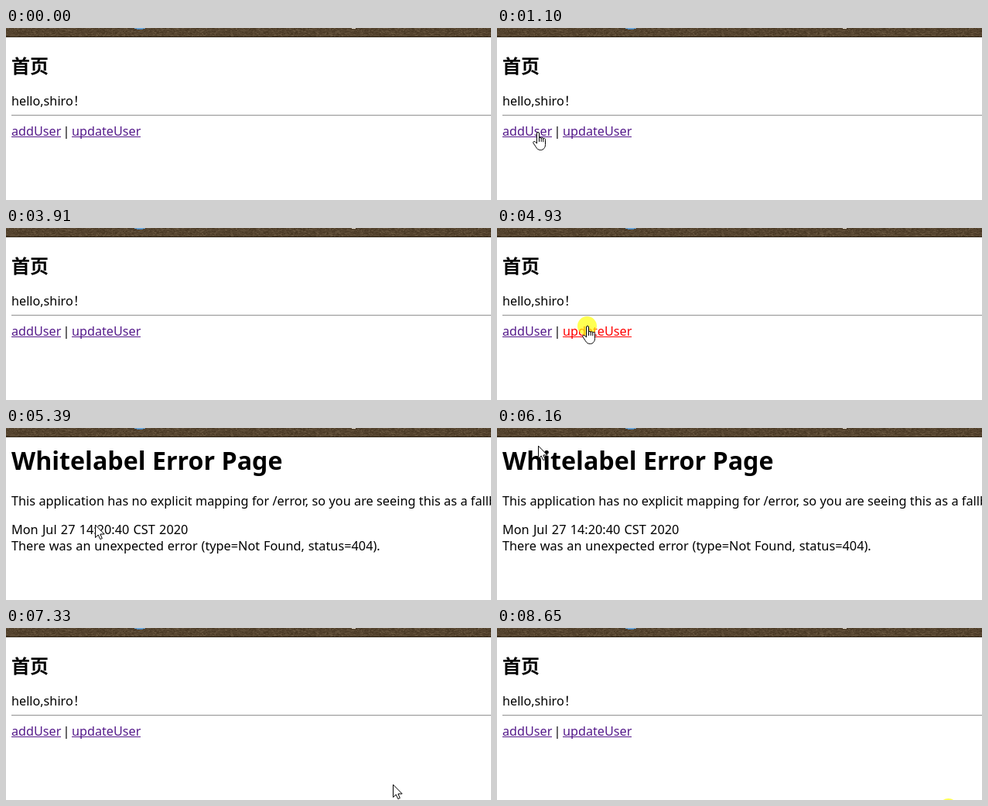
An HTML page with a canvas for the animation above (8.81 s loop, 627 by 222 pixels).

```html
<!DOCTYPE html>
<html lang="zh-CN">
<head>
<meta charset="utf-8">
<title>首页</title>
<style>
  html, body { margin: 0; width: 100%; height: 100%; overflow: hidden; background: #fff; }
  canvas, svg { position: absolute; left: 0; top: 0; display: block; }
  text { font: 16.2px "Noto Sans", "Noto Sans CJK SC", "Noto Sans CJK", sans-serif; fill: #000; white-space: pre; }
  .h1 { font-size: 32.2px; font-weight: 700; }
  .zh { font-size: 32px; font-weight: 700; font-family: "Noto Sans CJK SC", "Noto Sans CJK", sans-serif; }
  .h2 { font-size: 24px; }
  .link { color: #551a8b; }
  .link text { fill: currentColor; }
  .link path { stroke: currentColor; }
  .link.active { color: #f00; }
  .cursor { fill: #fff; stroke: #000; stroke-linejoin: round; stroke-linecap: round; }
</style>
</head>
<body>
<canvas id="strip" width="627" height="12"></canvas>
<svg width="627" height="222" viewBox="0 0 627 222">
  <g id="home">
    <text class="zh h2" x="7" y="58">首页</text>
    <text x="7" y="100">hello,shiro！</text>
    <path d="M7 112.5H627" stroke="#9a9a9a"/>
    <path d="M7 113.5H627" stroke="#eee"/>
    <g class="link" id="addLink">
      <text x="7" y="139">addUser</text>
      <path d="M7 140.5H71"/>
    </g>
    <text x="78" y="139" text-anchor="middle">|</text>
    <g class="link" id="updateLink">
      <text x="85" y="139">updateUser</text>
      <path d="M85 140.5H174"/>
    </g>
  </g>
  <g id="add">
    <text class="zh" x="7" y="69">增加用户</text>
  </g>
  <g id="error">
    <text class="h1" x="7" y="54">Whitelabel Error Page</text>
    <g style="font-size:16.3px">
      <text x="7" y="100" style="font-size:inherit;word-spacing:.1px">This application has no explicit mapping for /error, so you are seeing this as a fallback.</text>
      <text x="7" y="137" style="font-size:inherit;word-spacing:1px">Mon Jul 27 14:20:40 CST 2020</text>
      <text x="7" y="158" style="font-size:inherit;word-spacing:.6px">There was an unexpected error (type=Not Found, status=404).</text>
    </g>
  </g>
  <g id="pointer">
    <circle id="flash" cx=".5" cy=".5" r="12.5" fill="#ff0" fill-opacity=".68"/>
    <path id="arrow" class="cursor" d="M.5 .5V16.5L4.2 13 6.8 18.6 9.3 17.5 6.9 12H11.8Z"/>
    <g id="hand" class="cursor" transform="translate(-6 0)">
      <path d="M5.5 14.5V2a1.5 1.5 0 0 1 3 0V8.5a1.35 1.35 0 0 1 2.7 .2a1.3 1.3 0 0 1 2.6 .7a1.35 1.35 0 0 1 2.7 1V16.5c0 4-2.5 7-6 7c-3 0-5-1.5-6.2-4L1 14.6c-.9-1.8 1.2-3 2.5-1.6Z"/>
      <path d="M8.5 8.5V12.5M11.2 8.7V12.5M13.8 9.4V12.8" fill="none"/>
    </g>
  </g>
</svg>
<script>
const LOOP = 8810;
const $ = id => document.getElementById(id);
const show = (id, on) => { $(id).style.display = on ? '' : 'none'; };

// [start time, page]
const pages = [[0, 'home'], [1820, 'add'], [3840, 'home'], [5240, 'error'], [7180, 'home']];
// [press, release, link]
const clicks = [[950, 1100, 'addLink'], [4930, 5070, 'updateLink'], [8650, LOOP, '']];

const poses = [];
const pose = (t, x, y) => poses.push({ t, x, y });

// n evenly timed positions, slowing down by the given power
function glide(t0, t1, n, [x0, y0], [x1, y1], power = 1) {
  for (let k = 0; k < n; k++) {
    const p = k / (n - 1), e = 1 - (1 - p) ** power;
    pose(Math.round((t0 + (t1 - t0) * p) / 10) * 10, x0 + (x1 - x0) * e, y0 + (y1 - y0) * e);
  }
}

pose(0, 583, 232);
glide(70, 410, 6, [127, 191], [47, 140], 1.6);
pose(480, 51, 138);
glide(640, 810, 3, [51, 137], [52, 134]);
glide(2370, 2520, 3, [50, 110], [22, 6]);
pose(2590, 20, -40);
glide(4000, 4540, 8, [58, 42], [116, 126], 1.8);
pose(5320, 116, 126);
pose(5390, 115, 125);
pose(5470, 109, 115);
glide(5700, 6170, 7, [105, 106], [43, 6]);
pose(6250, 40, -40);
glide(6950, 7100, 3, [56, 0], [150, 104]);
glide(7180, 7330, 3, [262, 140], [500, 202]);
pose(7410, 583, 232);

const last = (list, hit) => list.filter(hit).pop();
const pageAt = t => last(pages, p => p[0] <= t)[1];

function overLink({ t, x, y }) {
  const inside = x >= 7 && x < 71 || x >= 85 && x < 174;
  return pageAt(t) === 'home' && y >= 122 && y < 143 && inside;
}

function draw(t) {
  const page = pageAt(t);
  for (const id of ['home', 'add', 'error']) show(id, id === page);

  const click = clicks.find(c => t >= c[0] && t < c[1]);
  for (const id of ['addLink', 'updateLink']) {
    $(id).classList.toggle('active', !!click && click[2] === id);
  }

  const at = last(poses, p => p.t <= t), hand = overLink(at);
  $('pointer').setAttribute('transform', `translate(${Math.round(at.x)} ${Math.round(at.y)})`);
  show('hand', hand);
  show('arrow', !hand);
  show('flash', !!click);
}

function paintStrip() {
  const g = $('strip').getContext('2d');
  let seed = 7;
  const rnd = () => (seed = seed * 16807 % 2147483647) / 2147483647;
  const rect = (color, x, y, w, h) => { g.fillStyle = color; g.fillRect(x, y, w, h); };
  rect('#54432e', 0, 0, 627, 12);
  for (let i = 0; i < 2200; i++) {
    const color = ['#483823', '#4c3b27', '#5e4c36', '#65533c'][Math.floor(rnd() * 4)];
    rect(color, Math.floor(rnd() * 627), Math.floor(rnd() * 11), 1 + Math.floor(rnd() * 3), 1);
  }
  rect('#2e2518', 0, 11, 627, 1);
  rect('#6fa8d8', 166, 0, 14, 1);
  rect('#4f86b8', 169, 1, 8, 1);
  rect('#e4dfd6', 447, 0, 5, 1);
}

paintStrip();
const start = performance.now();
function tick() {
  draw((performance.now() - start) % LOOP);
  requestAnimationFrame(tick);
}
tick();
</script>
</body>
</html>
```
